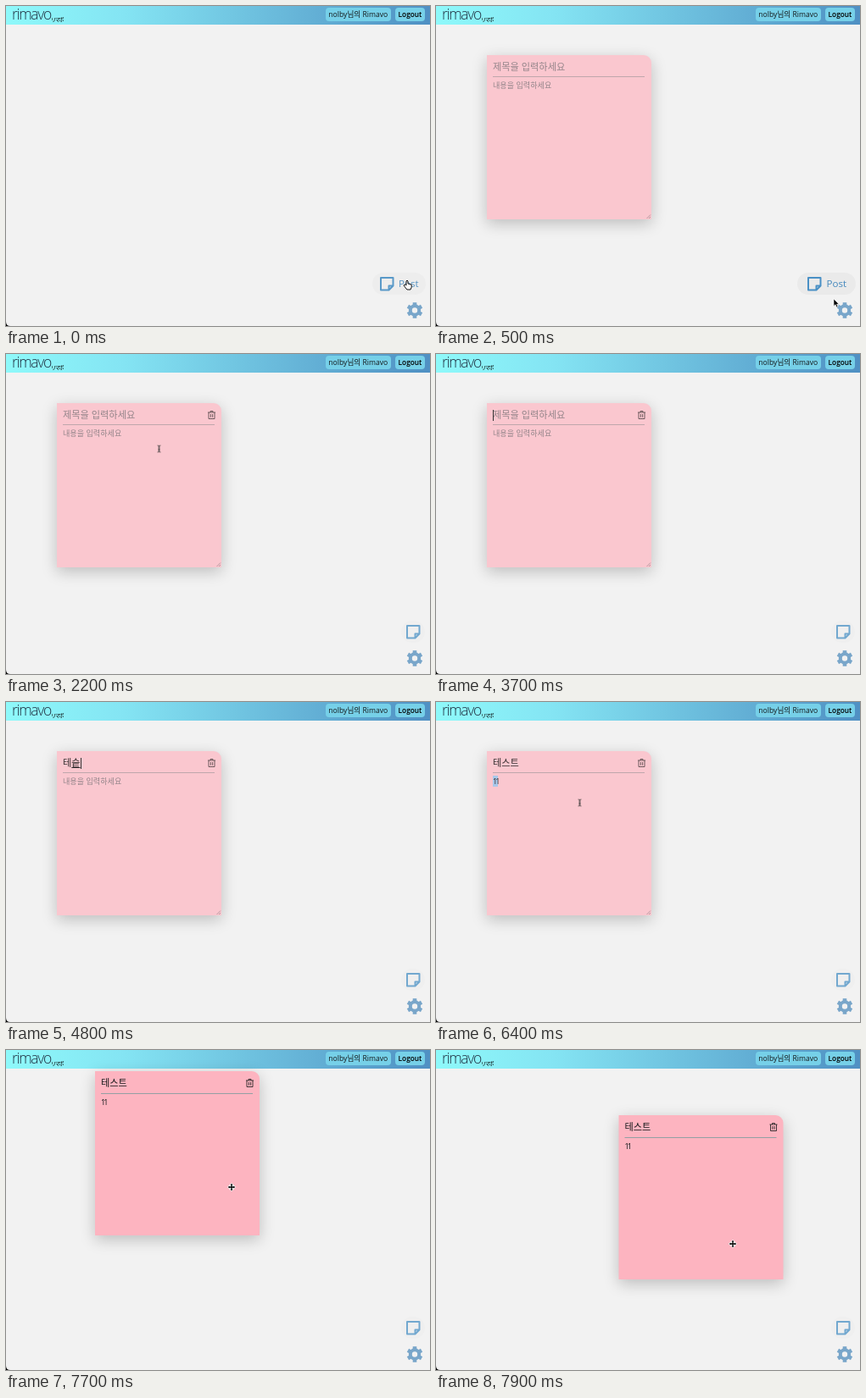
An HTML page that plays this animation: 500 by 378 pixels, repeating every 8 s.

```html
<!DOCTYPE html>
<html lang="ko">
<head>
<meta charset="utf-8">
<title>Sticky notes</title>
<style>
  html, body { margin: 0; width: 100%; height: 100%; overflow: hidden; }
  body {
    position: relative; background: #f2f2f2; color: #14181a;
    font-family: "Open Sans", "Noto Sans CJK KR", "Noto Sans CJK", sans-serif;
  }
  header, header *, .note, .note *, .pill, .layer { position: absolute; }
  header {
    left: 0; top: 0; width: 500px; height: 22px;
    background: linear-gradient(90deg, #8ef9fa, #84e4f3 28%, #4f90c3);
  }
  .brand { left: 7px; top: -4px; font: 300 17.5px/26px "Open Sans", sans-serif; letter-spacing: -1.3px; color: #234; }
  .kana { left: 53px; top: 12px; font-size: 6px; line-height: 9px; letter-spacing: -1.2px; white-space: nowrap; color: #000; }
  .button {
    top: 1.5px; height: 16.5px; border-radius: 4px; background: #76d0e8;
    font-size: 8.6px; line-height: 16px; text-align: center; white-space: nowrap;
  }

  .note {
    left: 0; top: 0; width: 194px; height: 194px; border-radius: 0 9px 0 0;
    background: #fdb4c0; box-shadow: 0 5px 18px rgba(0, 0, 0, .22);
    transform: translate(60px, 58px); animation: drag 8s linear infinite;
  }
  .note.editing { background: #fac7cf; color: #332d2f; }
  .title, .content { left: 7px; white-space: nowrap; }
  .title { top: 6px; font-size: 11.2px; line-height: 16px; }
  .content { top: 30px; font-size: 9.1px; line-height: 14px; }
  .editing .title { top: 5.5px; }
  .editing .content { top: 29px; }
  .note .hint { position: static; color: #94858a; }
  .note .typed, .note u { position: static; }
  .content .typed { letter-spacing: -2px; }
  .typed.selected { background: #a9c8ea; }
  .caret { width: 1px; background: #333; }
  .title .caret { height: 13px; top: 2px; }
  .content .caret { height: 11px; top: 1px; }
  .rule { left: 7px; top: 26px; width: 179px; height: 1px; background: #93a0a3; }
  .editing .rule { top: 25px; background: #bfa6ac; }
  .trash { left: 177px; top: 8px; }
  .editing .trash { opacity: .75; }
  .grip { right: 0; bottom: 0; }

  .pill { top: 315px; height: 26px; animation: pill 8s linear infinite; border-radius: 13px; }
  .layer { left: 0; top: 0; }
  .postIcon { animation: icon 8s linear infinite; }
  .postText { animation: label 8s linear infinite; }
  .pointer { animation: point 8s linear infinite; }

  @keyframes pill {
    0% { left: 432px; width: 63px; background: #ededed; }
    1.25%, 7.5% { left: 426px; width: 69px; background: #eaeaea; }
    10%, 100% { left: 466px; width: 28px; background: #efefef; }
  }
  @keyframes icon {
    0% { transform: translate(440px, 319px); opacity: .9; }
    1.25%, 7.5% { transform: translate(437px, 319px); opacity: 1; }
    10%, 100% { transform: translate(471px, 319px); opacity: .75; }
  }
  @keyframes label {
    0% { transform: translate(463px, 332px); opacity: .9; }
    1.25%, 7.5% { transform: translate(460.5px, 332px); opacity: 1; }
    9%, 100% { transform: translate(480px, 332px); opacity: 0; }
  }
  @keyframes drag {
    0%, 88.75% { transform: translate(60px, 58px); }
    91.25% { transform: translate(45px, 66px); }
    93.75% { transform: translate(48px, 42px); }
    96.25% { transform: translate(105px, 25px); }
    97.5% { transform: translate(163px, 42px); }
    98.75%, 100% { transform: translate(215.5px, 77px); }
  }
  @keyframes point {
    0%, 1.25% { transform: translate(474px, 329px); }
    6.25% { transform: translate(469px, 346px); }
    11.25% { transform: translate(465px, 347px); animation-timing-function: ease-in-out; }
    22.5% { transform: translate(220px, 128px); animation-timing-function: ease-out; }
    27.5%, 75% { transform: translate(180.5px, 112px); }
    80%, 82.5% { transform: translate(169.5px, 119px); }
    88.75% { transform: translate(212px, 208px); }
    91.25% { transform: translate(193px, 204px); }
    93.75% { transform: translate(205px, 175px); }
    96.25% { transform: translate(266px, 162px); }
    97.5% { transform: translate(312px, 187px); }
    98.75%, 100% { transform: translate(350px, 229px); }
  }
</style>
</head>
<body>
<header>
  <span class="brand">rimavo</span><span class="kana">リマボ</span>
  <span class="button" style="left:376.5px;width:77.5px">nolby님의 Rimavo</span>
  <span class="button" style="left:459px;width:35px;color:#000;font-size:8.3px;font-weight:600">Logout</span>
</header>

<div class="note" id="note">
  <div class="title" id="title"></div>
  <div class="rule"></div>
  <div class="content" id="content"></div>
  <svg class="trash" id="trash" width="11" height="12" fill="none" stroke="#2b2628" stroke-width=".9">
    <path d="M1 3H10M4 3V1.5H7V3M2 3V10.5H9V3M4.4 5V8.8M6.6 5V8.8"/>
  </svg>
  <svg class="grip" id="grip" width="7" height="7" stroke="#a0868c" stroke-width=".7">
    <path d="M1.5 6L6 1.5M4 6L6 4"/>
  </svg>
</div>

<div class="pill"></div>
<svg class="layer" width="500" height="378">
  <g class="postIcon" fill="none" stroke="#4990c5" stroke-width="2" stroke-linejoin="round">
    <path d="M2 2H16.5V11.5L11.5 16.5H2ZM16.5 11.5H11.5V16.5"/>
  </g>
  <text class="postText" font-size="11.6" fill="#4488bd">Post</text>
  <g transform="translate(482 359.5)" stroke="#79a6ca">
    <g id="teeth" stroke-width="4.6"></g>
    <circle r="5.2" fill="#f2f2f2" stroke-width="4"/>
  </g>
  <path d="M0 373Q0 378 5 378H0Z"/>
  <g class="pointer" id="pointer">
    <path data-kind="hand" fill="#fff" stroke="#111" stroke-linejoin="round"
      d="M-2 5L-5 1Q-4-1-2 1V-4Q-1-6 0-4V-1L4 0Q5 3 3 6H-1Z"/>
    <path data-kind="arrow" stroke="#fff" stroke-width=".6" d="M0 0V8.5L2 6.7L3.5 10L5 9.3L3.6 6.2H6.2Z"/>
    <path data-kind="beam" fill="none" stroke="#333" stroke-width=".8"
      d="M-1.8-4Q0-4 0-3V3Q0 4-1.8 4M1.8-4Q0-4 0-3V3Q0 4 1.8 4M-1 1H1"/>
    <g data-kind="move">
      <path fill="#fff" stroke="#fff" stroke-width="1.5" stroke-linejoin="round" d="M-4 0L0-4L4 0L0 4Z"/>
      <path stroke="#000" stroke-width="1.3" d="M-3 0H3M0-3V3"/>
      <path d="M-4.2 0L-2.4-1.5V1.5ZM4.2 0L2.4-1.5V1.5ZM0-4.2L-1.5-2.4H1.5ZM0 4.2L-1.5 2.4H1.5Z"/>
    </g>
  </g>
</svg>

<script>
  const LOOP = 8000, STEP = 100;
  const byId = id => document.getElementById(id);
  const between = (t, from, to) => t >= from && t < to;
  // Latest value whose start time has passed.
  const latest = (t, steps) => steps.filter(([start]) => start <= t).pop()[1];
  const show = (el, on) => { el.style.visibility = on ? 'visible' : 'hidden'; };

  const titles = [[0, ''], [4400, 'ㅌ'], [4600, '테'], [4700, '테스'], [4800, '테슽'], [4900, '테스트']];
  const contents = [[0, ''], [5500, '1'], [5800, '11']];
  const pointers = [[0, 'hand'], [300, 'arrow'], [1800, 'beam'], [3700, ''], [6000, 'beam'], [7000, 'move']];

  for (let angle = 0; angle < 180; angle += 60)
    byId('teeth').innerHTML += `<path d="M0-9.3V9.3" transform="rotate(${angle})"/>`;

  function field(id, value, hint, { composing, selected, caret }) {
    const text = composing ? `${value.slice(0, -1)}<u>${value.slice(-1)}</u>` : value;
    const caretMark = caret ? '<i class="caret"></i>' : '';
    const html = value
      ? `<span class="typed${selected ? ' selected' : ''}">${text}</span>${caretMark}`
      : `${caretMark}<span class="hint">${hint}</span>`;
    const el = byId(id);
    if (el.dataset.html !== html) el.innerHTML = el.dataset.html = html;
  }

  function render(t) {
    field('title', latest(t, titles), '제목을 입력하세요', {
      composing: between(t, 4400, 5100),
      caret: between(t, 2500, 3000) || between(t, 3700, 4200) || between(t, 4400, 5100)
    });
    field('content', latest(t, contents), '내용을 입력하세요', {
      selected: between(t, 6300, 6800),
      caret: between(t, 5100, 5400) || between(t, 5500, 6000)
    });
    const editing = t < 6900;
    byId('note').classList.toggle('editing', editing);
    byId('note').style.display = t >= 300 ? 'block' : 'none';
    show(byId('trash'), t >= 1800);
    show(byId('grip'), editing);
    const kind = latest(t, pointers);
    for (const shape of byId('pointer').children) show(shape, shape.dataset.kind === kind);
  }

  // Keeps the CSS motion and the typing on one 100 ms clock.
  const origin = performance.now();
  function tick() {
    const t = Math.floor((performance.now() - origin) % LOOP / STEP) * STEP;
    render(t);
    for (const motion of document.getAnimations()) {
      motion.pause();
      motion.currentTime = t;
    }
    requestAnimationFrame(tick);
  }
  tick();
</script>
</body>
</html>
```
